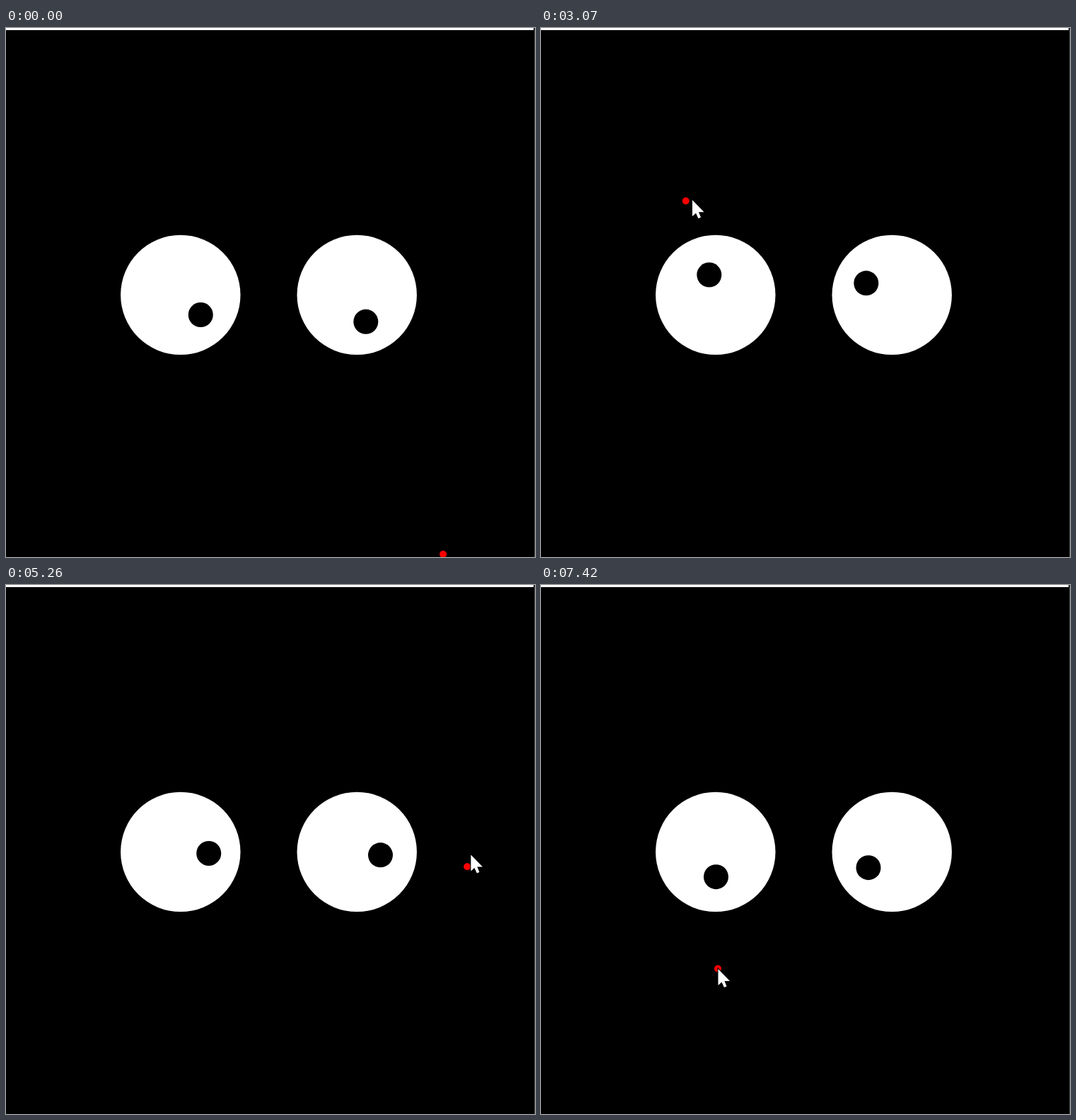
An HTML page with a canvas that plays this animation: 748x748 px, repeating every 8 s.

```html
<!DOCTYPE html>
<html lang="en">
<head>
<meta charset="utf-8">
<title>Following eyes</title>
<style>
  html, body { margin: 0; width: 100%; height: 100%; overflow: hidden; background: #000; }
  canvas { display: block; }
</style>
</head>
<body>
<canvas id="stage" width="748" height="748"></canvas>
<script>
const ctx = document.getElementById('stage').getContext('2d');
const SIZE = 748, LOOP = 8000;
const MOVE_START = 740, POINTER_LEAD = 30;
const EYES = [246.8, 496.2], EYE_Y = 377.4, EYE_R = 84.7;
const PUPIL_R = 17.5, REACH = 40, FOLLOW = 0.2135;

// Turning points and pauses of the pointer: [ms, x, y]
const PATH = [
  [710, 618, 744], [1020, 665, 672], [1500, 448, 650], [1790, 448, 650],
  [2000, 368, 643], [2200, 215, 552], [2520, 114, 377], [3070, 204.5, 244.5],
  [3190, 247, 240], [3430, 316, 265], [4240, 371, 424], [4560, 438, 488],
  [4670, 452.5, 488.5], [4850, 519, 504], [5060, 609, 482], [5430, 668, 305],
  [5880, 606, 97], [6410, 438, 157], [6750, 392.5, 324], [7080, 349, 478],
  [7420, 250, 542.5]
];

function slope(i, axis) {
  return (PATH[i + 1][axis] - PATH[i][axis]) / (PATH[i + 1][0] - PATH[i][0]);
}

// Harmonic tangents keep the curve from overshooting its turning points.
function tangent(i, axis) {
  if (i === 0 || i === PATH.length - 1) return 0;
  const a = slope(i - 1, axis), b = slope(i, axis);
  return a * b > 0 ? 2 * a * b / (a + b) : 0;
}

function pathAt(t) {
  let i = 0;
  while (i < PATH.length - 2 && PATH[i + 1][0] <= t) i++;
  const span = PATH[i + 1][0] - PATH[i][0];
  const u = Math.max(0, Math.min(1, (t - PATH[i][0]) / span)), v = 1 - u;
  return [1, 2].map(axis =>
    PATH[i][axis] * (1 + 2 * u) * v * v +
    PATH[i + 1][axis] * u * u * (3 - 2 * u) +
    span * u * v * (tangent(i, axis) * v - tangent(i + 1, axis) * u));
}

function disc(x, y, r, color) {
  ctx.fillStyle = color;
  ctx.beginPath();
  ctx.arc(x, y, r, 0, 2 * Math.PI);
  ctx.fill();
}

function eye(cx, [x, y]) {
  const dx = x - cx, dy = y - EYE_Y;
  const k = Math.min(FOLLOW, REACH / (Math.hypot(dx, dy) || 1));
  disc(cx, EYE_Y, EYE_R, '#fff');
  disc(cx + dx * k, EYE_Y + dy * k, PUPIL_R, '#000');
}

const arrow = new Path2D('M0 0V23L5 18.5L8.5 26L12 24.5L9 17H16.5Z');

function pointer([x, y]) {
  ctx.save();
  ctx.translate(x + 0.5, y + 0.5);
  ctx.lineWidth = 2;
  ctx.strokeStyle = '#000';
  ctx.stroke(arrow);
  ctx.fillStyle = '#fff';
  ctx.fill(arrow);
  ctx.restore();
}

function draw(t) {
  const dot = pathAt(t);
  ctx.fillStyle = '#000';
  ctx.fillRect(0, 0, SIZE, SIZE);
  EYES.forEach(cx => eye(cx, dot));
  disc(dot[0], dot[1], 5, '#f00');
  if (t >= MOVE_START) pointer(pathAt(t + POINTER_LEAD));
  ctx.fillStyle = '#fff';
  ctx.fillRect(0, 0, 746, 3);
  ctx.fillStyle = '#484848';
  ctx.fillRect(747, 0, 1, SIZE);
}

const start = performance.now();
function tick() {
  draw((performance.now() - start) % LOOP);
  requestAnimationFrame(tick);
}
tick();
</script>
</body>
</html>
```
